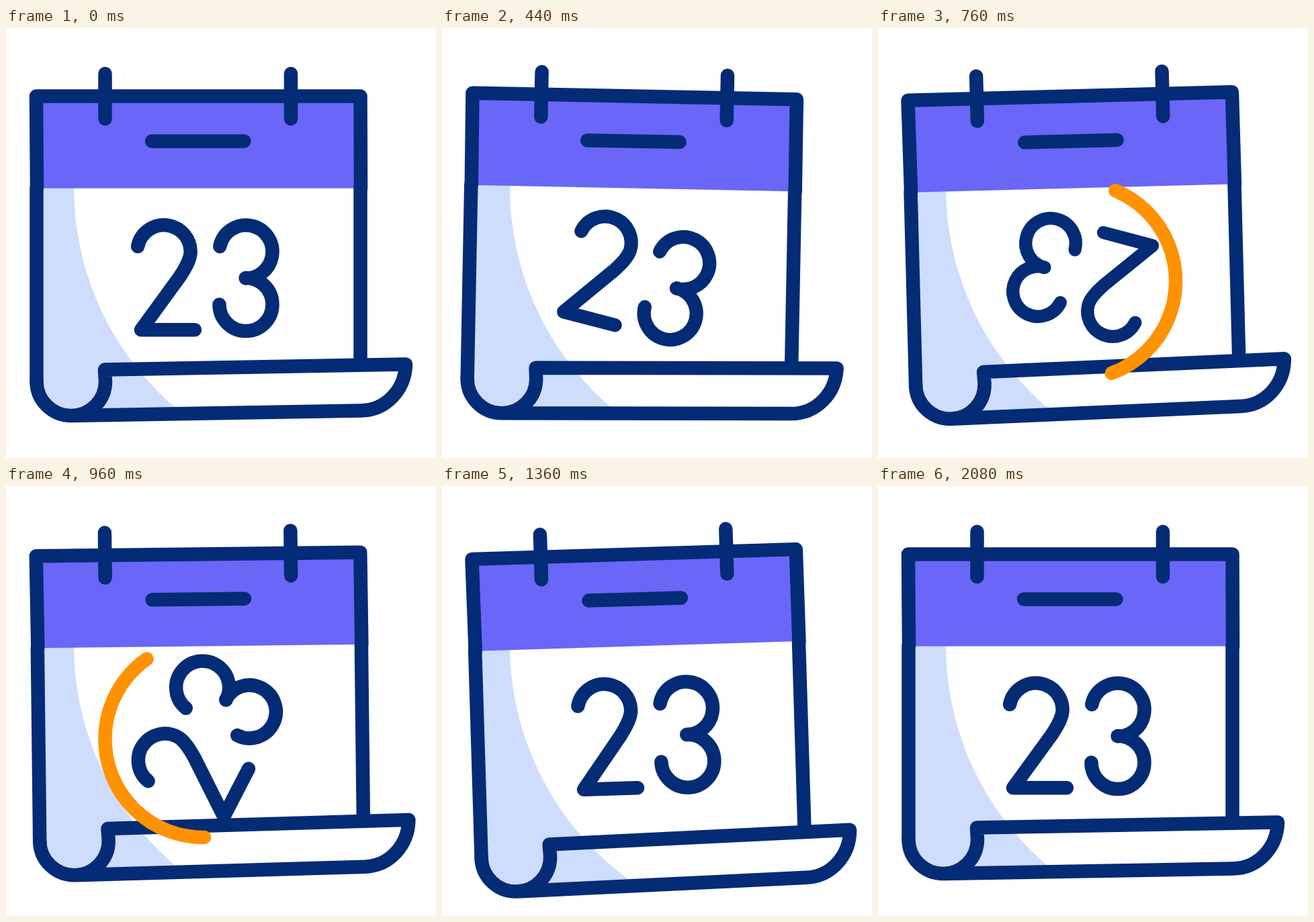
Write an HTML page with a canvas that moves like this. It is 640 px wide and 640 px high and loops after 2.4 s.

```html
<!DOCTYPE html>
<html lang="en">
<head>
<meta charset="utf-8">
<title>Calendar</title>
<style>
  html, body { margin: 0; width: 100%; height: 100%; overflow: hidden; background: #fff; }
  canvas { display: block; width: 640px; height: 640px; }
</style>
</head>
<body>
<canvas id="stage" width="640" height="640"></canvas>
<script>
const ctx = document.getElementById('stage').getContext('2d');
const NAVY = '#042b76', PURPLE = '#6a66f8', PALE = '#cfddfc', ORANGE = '#ff9200';
const LOOP = 2400, STEP = 40, TAU = Math.PI * 2, DEG = Math.PI / 180;

// [time, value] keys
const SWING = [[0, 0], [280, -5], [560, 5], [840, -3], [1120, 3], [1400, -2], [1680, 2], [2080, 0]];
const CURL = [[1120, 0], [1400, 22], [1680, -14], [2080, 0]];
const SHRINK = [[360, 1], [660, 0.925], [960, 1]];
const TRAIL_HEAD = [[480, 0], [1080, 1]];
const TRAIL_TAIL = [[660, 0], [1260, 1]];

const sine = u => (1 - Math.cos(Math.PI * u)) / 2;

function track(keys, t) {
  if (t <= keys[0][0]) return keys[0][1];
  for (let i = 1; i < keys.length; i++) {
    const [t0, a] = keys[i - 1], [t1, b] = keys[i];
    if (t < t1) return a + (b - a) * sine((t - t0) / (t1 - t0));
  }
  return keys[keys.length - 1][1];
}

// Cubic easing with flat ends and handles at x1 and x2
function bezier(u, x1, x2) {
  if (u <= 0) return 0;
  if (u >= 1) return 1;
  let lo = 0, hi = 1;
  for (let i = 0; i < 30; i++) {
    const s = (lo + hi) / 2, r = 1 - s;
    if (3 * r * r * s * x1 + 3 * r * s * s * x2 + s * s * s < u) lo = s; else hi = s;
  }
  return lo * lo * (3 - 2 * lo);
}

function stroke(path, color = NAVY, width = 20.5) {
  ctx.strokeStyle = color;
  ctx.lineWidth = width;
  ctx.stroke(path);
}

function line(...pts) {
  const p = new Path2D();
  for (let i = 0; i < pts.length; i += 2) p.lineTo(pts[i], pts[i + 1]);
  stroke(p);
}

function spin(x, y, deg, scale = 1) {
  ctx.translate(x, y);
  ctx.rotate(deg * DEG);
  ctx.scale(scale, scale);
  ctx.translate(-x, -y);
}

function shade(dy) {
  ctx.save();
  const page = new Path2D(
    `M45.5 200H527.5V${501 + dy}L595 ${500.5 + dy}L528 ${569.5 + dy}` +
    `L97 ${577 + dy}A51.5 51 0 0 1 45.5 ${526 + dy}Z`);
  ctx.clip(page);
  ctx.setTransform(1, 0, 0, 1, 0, 0);
  ctx.beginPath();
  ctx.rect(-20, -20, 680, 680);
  ctx.moveTo(965, 237);
  ctx.arc(533, 237, 432, 0, TAU);
  ctx.fillStyle = PALE;
  ctx.fill('evenodd');
  ctx.restore();
}

function calendar(dy) {
  shade(dy);
  ctx.fillStyle = PURPLE;
  ctx.fillRect(45, 101, 482.5, 137.5);

  line(45.5, 238, 45.5, 527 + dy);
  line(527.5, 238, 527.5, 501 + dy);
  line(46, 238, 45, 101.5, 527.5, 101.5, 528, 239);
  line(147.5, 68, 147.5, 135);
  line(424, 68, 424, 135);
  line(217, 168.5, 354.5, 168.5);

  ctx.save();
  ctx.translate(0, dy);
  stroke(new Path2D('M45.5 526A51.5 51 0 0 0 97 577A51 51 0 0 0 148 526L147 508.5' +
    'L595 500.5C594 538 566 569 528 569.5L97 577'));
  ctx.restore();
}

function trail(t) {
  const head = track(TRAIL_HEAD, t), tail = track(TRAIL_TAIL, t);
  if (head - tail < 0.0005) return;
  const p = new Path2D();
  p.arc(290.5, 377, 146, (tail - 0.25) * TAU, (head - 0.25) * TAU);
  stroke(p, ORANGE);
}

function digits(t) {
  ctx.save();
  spin(296.3, 371.8, 360 * bezier((t - 382) / 846, 0.167, 0.603), track(SHRINK, t));
  const two = new Path2D(), three = new Path2D(), from = 191.5 * DEG;
  two.arc(235, 333, 39.7, from, TAU);
  two.bezierCurveTo(274.7, 345, 266, 359, 258, 371);
  two.lineTo(201, 449.3);
  two.lineTo(281, 449.3);
  three.arc(357, 333, 39.5, from, TAU + Math.PI / 2);
  three.lineTo(356.5, 372.3);
  three.arc(357, 411.5, 39.5, -Math.PI / 2, Math.PI);
  stroke(two);
  stroke(three);
  ctx.restore();
}

function draw(t) {
  ctx.setTransform(1, 0, 0, 1, 0, 0);
  ctx.fillStyle = '#fff';
  ctx.fillRect(0, 0, 640, 640);
  ctx.lineCap = ctx.lineJoin = 'round';
  spin(286, 122, track(SWING, t));
  calendar(track(CURL, t));
  trail(t);
  digits(t);
}

let start = null;
function tick(now) {
  if (start === null) start = now;
  const t = (now - start) % LOOP;
  draw(Math.floor(t / STEP + 0.01) * STEP);
  requestAnimationFrame(tick);
}
draw(0);
requestAnimationFrame(tick);
</script>
</body>
</html>
```
